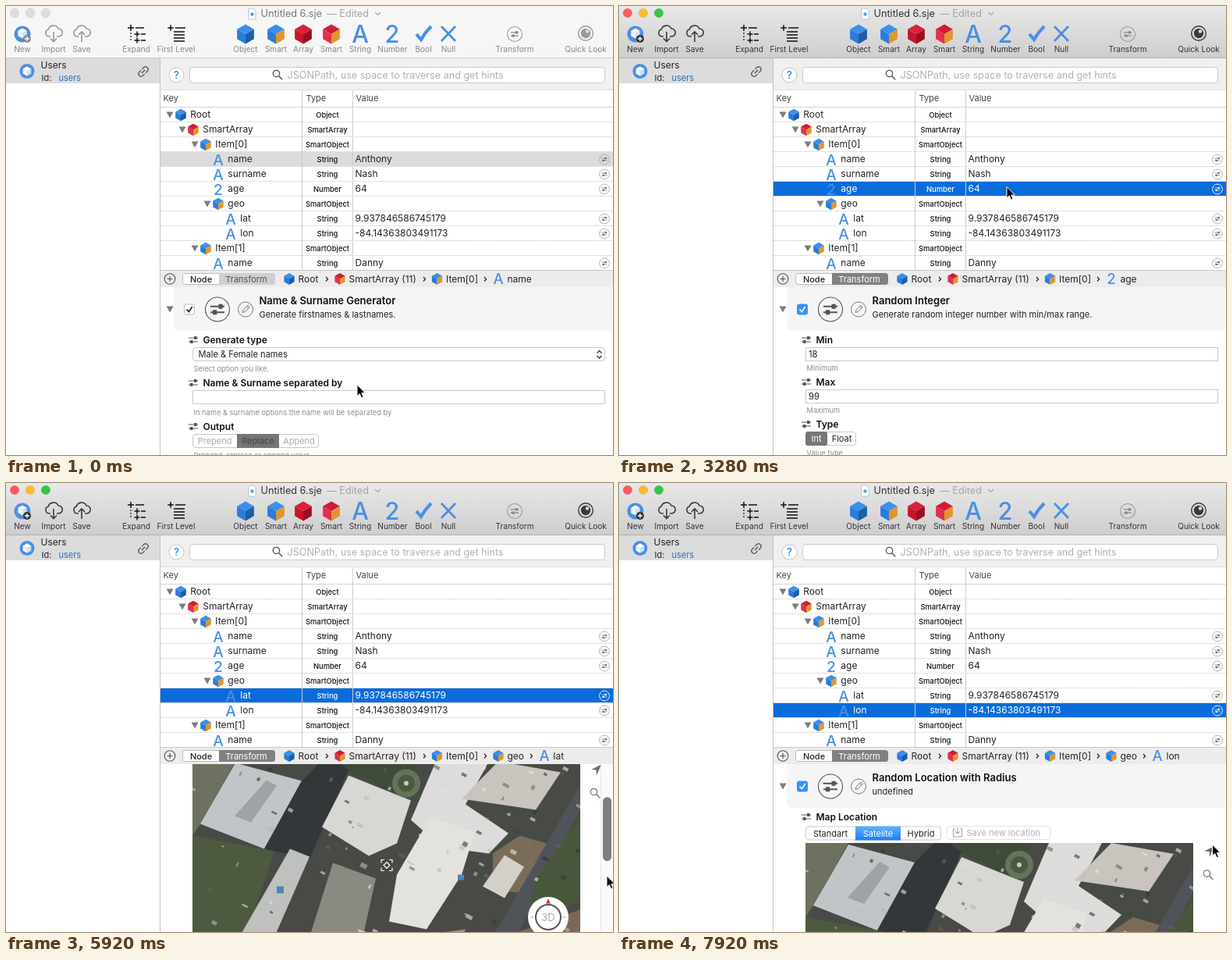
Animation of 778x575 px, one loop 8000 ms. Source, as an HTML page:

```html
<!DOCTYPE html>
<html lang="en">
<head>
<meta charset="utf-8">
<title>JSON editor</title>
<style>
html, body { margin: 0; width: 100%; height: 100%; overflow: hidden; background: #fff; }
svg { display: block; }
text { font-family: Inter, "Open Sans", sans-serif; white-space: pre; }
</style>
</head>
<body>
<svg id="stage" width="778" height="575" viewBox="0 0 778 575"></svg>
<script>
const LOOP = 8000, STEP = 80, ACTIVE_AT = 800, BLUE = '#4a90e2';

// time, x, y of the pointer tip
const pointer = [
  [0, 450, 485], [400, 522, 199], [560, 522, 199], [640, 497, 183], [760, 497, 183],
  [1280, 504.5, 212], [2480, 504.5, 212], [2880, 497, 231.5], [3920, 497, 231.5], [4080, 500, 250],
  [4240, 500, 250], [4560, 503, 271], [4800, 503, 271], [5280, 737, 451], [5520, 770, 372],
  [5600, 770, 372], [5920, 770, 503], [6400, 769.5, 503], [7200, 520, 290], [7680, 520, 290], [7920, 760.5, 463]
];
const scrolling = [[5600, 0], [5760, 30], [5920, 104.5], [6080, 230], [6240, 332]];
const barFade = [[5320, 0], [5480, 1], [6720, 1], [7100, 0]];
// time of each click and the row it selects
const clicks = [[0, 3], [1840, 4], [3120, 5], [4720, 7], [7360, 8]];

const cubes = {
  object: ['#3a90ea', '#2a7cdb', '#1b5da9'],
  smart: ['#3a90ea', '#2a7cdb', '#e0962f'],
  array: ['#d9213b', '#c8142d', '#98101f'],
  smartArray: ['#d01c36', '#e0304b', '#e0962f']
};
const rows = [
  [0, 'object', 'Root', 'Object'],
  [1, 'smartArray', 'SmartArray', 'SmartArray'],
  [2, 'smart', 'Item[0]', 'SmartObject'],
  [3, 'A', 'name', 'String', 'Anthony'],
  [3, 'A', 'surname', 'String', 'Nash'],
  [3, '2', 'age', 'Number', '64'],
  [3, 'smart', 'geo', 'SmartObject'],
  [4, 'A', 'lat', 'String', '9.937846586745179'],
  [4, 'A', 'lon', 'String', '-84.14363803491173'],
  [2, 'smart', 'Item[1]', 'SmartObject'],
  [3, 'A', 'name', 'String', 'Danny']
];

const esc = s => s.replace(/&/g, '&amp;');
const text = (x, y, s, size = 12, fill = '#222', more = '') =>
  `<text x="${x}" y="${y}" font-size="${size}" fill="${fill}" ${more}>${esc(s)}</text>`;
const mid = (x, y, s, size, fill, more = '') => text(x, y, s, size, fill, 'text-anchor="middle" ' + more);
const rect = (x, y, w, h, fill, more = '') => `<rect x="${x}" y="${y}" width="${w}" height="${h}" fill="${fill}" ${more}/>`;
const circle = (x, y, r, fill, stroke = 'none', w = 1) =>
  `<circle cx="${x}" cy="${y}" r="${r}" fill="${fill}" stroke="${stroke}" stroke-width="${w}"/>`;
const line = (d, stroke, w = 1, more = '') => `<path d="${d}" fill="none" stroke="${stroke}" stroke-width="${w}" ${more}/>`;
const shape = (d, fill, more = '') => `<path d="${d}" fill="${fill}" ${more}/>`;
const at = (x, y, s, k = 1) => `<g transform="translate(${x} ${y}) scale(${k})">${s}</g>`;
const box = (x, y, w, h, r = 0) => rect(x + .5, y + .5, w - 1, h - 1, '#fff', `rx="${r}" stroke="#c9c9c9"`);

function ease(keys, t) {
  let i = keys.findIndex(k => k[0] > t);
  if (i < 0) return keys[keys.length - 1].slice(1);
  if (!i) return keys[0].slice(1);
  const a = keys[i - 1], b = keys[i], u = (t - a[0]) / (b[0] - a[0]), e = u * u * (3 - 2 * u);
  return a.slice(1).map((v, j) => v + (b[j + 1] - v) * e);
}
const latest = t => clicks.filter(c => c[0] <= t).pop();

function cube(x, y, r, [top, left, right]) {
  const w = r * .87, h = r / 2;
  return at(x, y, shape(`M0 ${-r}L${w} ${-h}L0 0L${-w} ${-h}Z`, top) +
    shape(`M${-w} ${-h}L0 0V${r}L${-w} ${h}Z`, left) + shape(`M${w} ${-h}L0 0V${r}L${w} ${h}Z`, right));
}
const icon = (x, y, kind, r = 7.8) => cubes[kind] ? cube(x, y, r, cubes[kind])
  : mid(x, y + r * .9, kind, r * 2.45, BLUE, 'font-weight="500"');
const sliders = (x, y, k, c) => at(x, y, line('M-6-2.5H6M-6 2.5H6', c, 1.2) +
  rect(1, -4.5, 3.5, 4, c) + rect(-4, .5, 3.5, 4, c), k);
const plus = (x, y, r, c, w) => line(`M${x - r} ${y}h${2 * r}M${x} ${y - r}v${2 * r}`, c, w);
const lens = (x, y, c) => circle(x - 1.5, y - 1.5, 4.2, 'none', c, 1.3) + line(`M${x + 1.8} ${y + 1.8}l4.4 4.4`, c, 1.6);
const triangle = (x, y) => shape(`M${x - 4.5} ${y - 3.5}h9l-4.5 8z`, '#7d7d7d');

function toolbar(active) {
  const label = active ? '#333' : '#888', ink = active ? '#3c3c3c' : '#999';
  const cloud = line('M-4 6H-6a4.6 4.6 0 0 1-.7-9A6.8 6.8 0 0 1 6-4a5 5 0 0 1 .5 10H4', ink, 1.6);
  let s = rect(0, 0, 778, 66, active ? 'url(#bar)' : '#f6f6f6') + rect(0, 66, 778, 1, active ? '#b1b1b1' : '#d0d0d0');
  ['#fc5b57', '#fdbc2e', '#33c748'].forEach((c, i) => s += circle(11 + 20 * i, 9, 5.8, active ? c : '#dcdcdc', active ? 'rgba(0,0,0,.12)' : '#cfcfcf', .6));
  s += shape('M311 3h6l3 3v11h-9z', '#fff', 'stroke="#9bbbe0" stroke-width=".8"') + circle(315.5, 10.5, 2.2, '#5b9fe8');
  s += text(326.5, 13.6, 'Untitled 6.sje', 12.7, active ? '#333' : '#777') + text(411, 13.6, '— Edited', 12.7, '#a5a5a5');
  s += line('M473 8l3.5 3.5 3.5-3.5', '#a5a5a5', 1.2);
  s += circle(21, 36, 10.5, BLUE) + cube(21, 35, 6.5, ['#fff', '#eef4fc', '#cfe0f5']) +
    circle(27, 42, 5, active ? '#333' : '#888') + plus(27, 42, 3, '#fff', 1.4);
  s += at(61, 33, cloud + line('M0 0V12M-4 8.5L0 12.5L4 8.5', ink, 1.6));
  s += at(97, 33, cloud + line('M0 13V0M-4 4L0 0L4 4', ink, 1.6));
  s += plus(160, 28, 4, '#111', 1.5) + plus(168, 36, 3.5, '#111', 1.5) + plus(168, 44, 3.5, '#111', 1.5) +
    line('M166 28h11M173 36h6M173 44h6', '#111', 1.5) + line('M160 34v10', '#111', 1.2, 'stroke-dasharray="2 2"');
  s += plus(211, 28, 3.8, '#111', 1.5) + line('M217 28h13M215 33h14M215 37h14M215 41h14M215 45h14', '#111', 1.5);
  s += cube(307, 36, 12.5, cubes.object) + cube(346, 36, 12.5, cubes.smart) +
    cube(381, 36, 12.5, cubes.array) + cube(417, 36, 12.5, cubes.smartArray);
  s += icon(454, 35.5, 'A', 12.5) + icon(495, 35.5, '2', 12.5);
  s += line('M526 36l6 7Q537 34 545 26', BLUE, 4.2) + line('M558 26l18 19M576 26l-18 19', BLUE, 2.8);
  s += circle(652, 36, 9.5, 'none', '#999', 1.1) + sliders(652, 36, .85, '#888');
  s += circle(743, 35, 9.3, 'none', ink, 1.4) + circle(743, 35, 6.2, ink) + circle(745, 32.5, 2.2, '#ddd');
  const names = { New: 21, Import: 61, Save: 97, Expand: 167, 'First Level': 218, Object: 307, Smart: 346, Array: 381,
    'Smart ': 417, String: 454, Number: 495.5, Bool: 535, Null: 567, Transform: 652, 'Quick Look': 743 };
  for (const n in names) s += mid(names[n], 59, n.trim(), 10.1, label);
  return s;
}

function sidebar() {
  return rect(0, 67, 197, 32, '#dcdcdc') + rect(197, 67, 1, 508, '#c4c4c4') +
    circle(27, 83.5, 9.5, BLUE) + cube(27, 83.5, 6.2, ['#fff', '#eef4fc', '#cfe0f5']) +
    text(44.5, 80, 'Users', 12) + text(45.5, 96, 'Id:', 11) + text(67.5, 96, 'users', 11, '#2f6fb5') +
    `<g transform="translate(176 84) rotate(-45)">${line('M-1-3.3h-3a3.3 3.3 0 0 0 0 6.6h3M1-3.3h3a3.3 3.3 0 0 1 0 6.6h-3M-3 0h6', '#666', 1.5)}</g>`;
}

function table(sel, active) {
  let s = rect(198, 67, 580, 41, '#f0f0f0') + circle(218.5, 88.5, 9.5, '#fff', '#c4c4c4') +
    mid(218.5, 93, '?', 13, '#1a82f7', 'font-weight="500"') + box(235, 78, 533, 21, 4) + lens(348, 88, '#555') +
    text(360.5, 93, 'JSONPath, use space to traverse and get hints', 12.6, '#b0b0b0');
  s += rect(198, 107, 580, 1, '#dedede') + rect(198, 129, 580, 1, '#d4d4d4');
  s += text(201.5, 122, 'Key', 11, '#444') + text(384.5, 122, 'Type', 11, '#444') + text(448.5, 122, 'Value', 11, '#444');
  rows.forEach(([depth, kind, key, type, value], i) => {
    const y = 130 + 19 * i, x = 16 * depth, on = i == sel, ink = on && active ? '#fff' : '#222';
    if (on) s += rect(198, y, 580, 18, active ? '#0a6cda' : '#dcdcdc');
    s += line(`M198 ${y + 18.5}H778`, '#c4c4c4', 1, 'stroke-dasharray="1 1"');
    if (cubes[kind]) s += triangle(210 + x, y + 9);
    s += icon(224 + x, y + 9.5, kind) + text(236.3 + x, y + 13.2, key, 12, ink) +
      mid(412, y + 13, type, 9.4, on && active ? '#fff' : '#111', 'font-weight="500"');
    if (value) s += text(447.5, y + 13.2, value, 12, ink) +
      circle(767, y + 9.5, 6.4, 'none', on && active ? '#fff' : '#aaa', .9) + sliders(767, y + 9.5, .58, on && active ? '#fff' : '#666');
  });
  return s + rect(379, 108, 1, 230, '#ccc') + rect(444, 108, 1, 230, '#ccc');
}

function pathBar(row, active) {
  let s = rect(198, 338, 580, 22, '#ececec') + rect(198, 338, 580, 1, '#c8c8c8') +
    circle(210, 349.5, 6.8, 'none', '#555', 1.1) + plus(210, 349.5, 3.5, '#555', 1.2);
  s += rect(226.5, 342.5, 118, 14, '#fff', 'rx="3.5" stroke="#bdbdbd"') +
    shape('M273 342h68.500a3.500 3.500 0 0 1 3.500 3.500v8a3.500 3.500 0 0 1-3.500 3.500H273z', active ? '#818181' : '#cfcfcf') +
    mid(250, 353.5, 'Node', 11, '#222', 'font-weight="500"') + mid(308, 353.5, 'Transform', 11, active ? '#fff' : '#555');
  const crumb = (x, kind, name) => icon(x, 349.5, kind, 7.6) + text(x + 11.5, 353.7, name, 12);
  const arrow = x => line(`M${x - 1} 347l2.500 2.700-2.500 2.700`, '#333', 1.4);
  s += crumb(363, 'object', 'Root') + arrow(411) + crumb(428, 'smartArray', 'SmartArray (11)') + arrow(536) +
    crumb(552.5, 'smart', 'Item[0]') + arrow(614);
  const [depth, kind, key] = rows[row];
  return s + (depth == 4 ? crumb(631, 'smart', 'geo') + arrow(673) + crumb(690, kind, key) : crumb(631, kind, key));
}

const section = (y, s) => sliders(240, y, 1, '#555') + text(252.5, y + 4.4, s, 12, '#111', 'font-weight="600"');
const hint = (y, s) => text(240.5, y, s, 9.3, '#8c8c8c');
const field = (y, s) => box(239, y, 529, 18) + text(243, y + 13.3, s, 11.2);

function segments(y, edges, names, sel, fill, active = true) {
  const end = edges[edges.length - 1];
  let s = box(edges[0], y, end - edges[0], 18, 3.5);
  names.forEach((n, i) => {
    const x = edges[i], w = edges[i + 1] - x;
    s += i == sel ? rect(x, y, w, 18, fill, i ? '' : 'rx="3"') : i > 0 && i - 1 != sel ? rect(x, y + 1, 1, 16, '#ddd') : '';
    s += mid(x + w / 2, y + 13, n, 11, i == sel ? (active ? '#fff' : '#444') : active ? '#222' : '#aaa');
  });
  return s;
}

function head(title, note, active) {
  return rect(215, 350, 562, 66, '#f5f5f5', 'rx="6"') + triangle(210, 388) +
    (active ? rect(228, 381.5, 14, 14, '#3393fb', 'rx="3"') : rect(228.5, 382, 13, 13, '#fff', 'rx="3" stroke="#bbb"')) +
    line('M231.500 388.500l2.800 3.200 4.400-6.700', active ? '#fff' : '#222', 1.7) +
    circle(271, 388.5, 15.5, 'none', '#555', 1.1) + sliders(271, 388.5, 1.5, '#555') +
    circle(307, 388.5, 9.5, 'none', '#777') + line('M303 392.500l1-3.300 6-6 2.300 2.300-6 6zM308.500 384.700l2.300 2.300', '#777') +
    text(324.5, 382.4, title, 13, '#111', 'font-weight="600"') + text(324.5, 398.6, note, 11);
}

function namePanel(row, active) {
  return head('Name & Surname Generator', 'Generate firstnames & lastnames.', active) +
    section(427.5, 'Generate type') + box(239, 437, 529, 18, 3.5) +
    text(246.5, 450, row == 3 ? 'Male & Female names' : 'Surnames', 11.1) +
    (active ? rect(753, 437, 15, 18, 'url(#hot)', 'rx="3"') : '') +
    line('M757.500 444.500l3-3 3 3M757.500 448l3 3 3-3', active ? '#fff' : '#333', 1.3) +
    hint(467.5, 'Select option you like.') + section(482.5, 'Name & Surname separated by') + field(492, '') +
    hint(523.5, 'In name & surname options the name will be separated by') + section(538.5, 'Output') +
    segments(548, [239, 296, 350, 401], ['Prepend', 'Replace', 'Append'], 1, '#767676', active) +
    hint(578.5, 'Prepend, replace or append value');
}

function agePanel() {
  return head('Random Integer', 'Generate random integer number with min/max range.', true) +
    section(427.5, 'Min') + field(437, '18') + hint(467, 'Minimum') +
    section(481.5, 'Max') + field(491, '99') + hint(521, 'Maximum') +
    section(535.5, 'Type') + segments(545, [239, 267, 304], ['Int', 'Float'], 0, '#767676') + hint(575.5, 'Value type');
}

// Simplified aerial view, in map coordinates
const aerial = [
  ['#4e5a40', 'M0 95L105 115 55 265H0z'], ['#6d7260', 'M0 0H55L10 80 0 95z'],
  ['#c2c5c8', 'M10 80L55 2 140 25 92 112z'], ['#9ea3a3', 'M54 70L95 24 108 31 75 78z'],
  ['#33373a', 'M140 25L165 0H205L150 125 92 112z'], ['#3f4a38', 'M185 0H290L270 45 205 15z'],
  ['#d7d7d3', 'M166 84L200 18 280 50 262 105 226 121z'], ['#bfc1bf', 'M125 112L150 122 105 225H60z'],
  ['#8a8a82', 'M180 130L235 150 215 240 150 225z'], ['#dddcda', 'M280 75L312 0H380L350 55 405 92 380 118 320 110z'],
  ['#e3e2df', 'M262 145L305 72 362 90 345 145 300 215 252 205z'], ['#c9c4bd', 'M345 48L392 0 472 14 440 62 400 56z'],
  ['#7b6b59', 'M385 118L420 95 470 110 440 170 385 165z'], ['#d3d0ca', 'M372 160L400 120 425 135 400 175z'],
  ['#50535a', 'M497 30V62L395 265H362z'], ['#48573c', 'M497 72V180L430 200 440 150z'],
  ['#7d6656', 'M385 230L497 190V265H365z'], ['#cfccc5', 'M120 235L170 245 165 265H105zM212 215L245 225 262 265H225z'],
  ['#98928a', 'M275 225L350 215 330 265H265z'], ['#4d86b5', 'M108 160h9v9h-9zM340 145h8v7h-8z']
];
const details = (() => {
  let seed = 7, s = '';
  const rnd = () => (seed = seed * 16807 % 2147483647) / 2147483647;
  for (let i = 0; i < 110; i++) {
    const c = ['#2f3831', '#b9b9b4', '#64695a', '#e5e4e0'][i % 4];
    s += `<g transform="translate(${rnd() * 497 | 0} ${rnd() * 265 | 0}) rotate(28)">${rect(0, 0, 2 + rnd() * 7, 2 + rnd() * 4, c, 'opacity=".6"')}</g>`;
  }
  return s;
})();
const aerialView = rect(0, 0, 497, 265, '#484b45') + aerial.map(([c, d]) => shape(d, c)).join('') + details +
  circle(274, 28, 18, '#65735a') + circle(274, 28, 11, '#495a40') + circle(274, 28, 3, '#c9c9c0');

function mapView(opacity) {
  const button = (x, sign) => rect(x, 230, 26.5, 20, '#fff', 'rx="3"') + line(sign, '#333', 1.3);
  return `<svg x="239" y="461" width="497" height="265">${rect(0, 0, 497, 265, '#f4f1e9')}<g opacity="${opacity}">${aerialView}</g>` +
    line('M242 130v-4h4M252 126h4v4M256 136v4h-4M246 140h-4v-4M249 129l4 4-4 4-4-4z', '#fff', 1.2) +
    circle(456, 199.5, 26, '#fff') + circle(456, 199.5, 16, 'none', '#555', 2) + mid(456, 204.2, '3D', 13, '#aaa') +
    shape('M453 182l3-6 3 6z', '#e02b2b') + line('M433 199.500h4M475 199.500h4', '#aaa') +
    button(428, 'M436 240h11') + button(457, 'M464 240h11M469.500 234.500v11') +
    text(6, 259, 'Legal', 9.8, '#ccc', 'text-decoration="underline"') + '</svg>';
}

function placePanel(row, opacity) {
  const radio = (y, name, on) => circle(248, y, 7.6, on ? '#3393fb' : '#fff', on ? '#2a86ee' : '#bbb') +
    (on ? circle(248, y, 2.8, '#fff') : '') + text(259, y + 4.3, name, 12);
  return head('Random Location with Radius', 'undefined', true) + section(427.5, 'Map Location') +
    segments(439.5, [239, 303, 361, 413], ['Standart', 'Satelite', 'Hybrid'], 1, 'url(#hot)') +
    rect(420.5, 439.5, 132, 17, '#fff', 'rx="3.5" stroke="#e3e3e3"') +
    line('M431 443h-2.500v10h11v-10H437M434 441v8M431.500 446.500l2.500 2.500 2.500-2.500', '#aaa', 1.1) + text(445.5, 452, 'Save new location', 11, '#b0b0b0') +
    mapView(opacity) + shape('M763 465l-13 6.500 6.500.5.500 7z', '#6e6e6e') + lens(755, 501.5, '#777') +
    hint(739, 'Zoom and center region on map') +
    text(238.5, 758, 'latitude:9.93801866254546, longitude:-84.1429226282799, latitudeDelta: 0.00132492656564764, longitudeDelta:', 9.1) +
    text(238.5, 769, '0.00251323169906925', 9.1) + section(784, 'Radius') + field(793, '100') +
    hint(823, 'Select random radius in meters') + section(838, 'Output value of') +
    radio(857, 'Latitude', row == 7) + radio(877, 'Longitude', row == 8) +
    hint(899, 'Select output option for plugin') + rect(198, 904, 580, 1, '#dcdcdc');
}

const defs = `<defs><linearGradient id="bar" x2="0" y2="1"><stop stop-color="#e9e8e9"/><stop offset="1" stop-color="#cfcecf"/></linearGradient>
<linearGradient id="hot" x2="0" y2="1"><stop stop-color="#62b2fa"/><stop offset="1" stop-color="#1a7ef8"/></linearGradient></defs>`;

function scene(t) {
  const active = t >= ACTIVE_AT, selected = latest(t)[1];
  const [since, row] = latest(Math.max(0, t - STEP)); // the panel follows the click one step later
  const scroll = row == 7 ? ease(scrolling, t)[0] : 0, fade = row == 7 ? ease(barFade, t)[0] : 0;
  const panel = row < 5 ? namePanel(row, active) : row == 5 ? agePanel()
    : placePanel(row, Math.min(1, (t - since - STEP) / (row == 7 ? 240 : 80)));
  const bar = fade ? `<g opacity="${fade}">${rect(762, 360, 16, 215, '#fafafa')}${rect(762, 360, 1, 215, '#e6e6e6')}` +
    `${rect(765, 361 + scroll * 131 / 332, 11, 82, '#7f7f7f', 'rx="5.5"')}</g>` : '';
  const [x, y] = ease(pointer, t);
  return defs + rect(0, 0, 778, 575, '#fff') + toolbar(active) + sidebar() + table(selected, active) + pathBar(row, active) +
    `<svg x="198" y="360" width="580" height="215" viewBox="198 360 580 215">${at(0, -scroll, panel)}${bar}</svg>` +
    at(x, y, shape('M0 0V14.500L3.300 11.500 5.600 16.700 8 15.700 5.800 10.500H10.300z', '#000', 'stroke="#fff" stroke-width="1"'));
}

const stage = document.getElementById('stage'), start = performance.now();
let shown = -1;
function tick() {
  const t = Math.floor((performance.now() - start) % LOOP / STEP) * STEP;
  if (t != shown) stage.innerHTML = scene(shown = t);
  requestAnimationFrame(tick);
}
tick();
</script>
</body>
</html>
```
